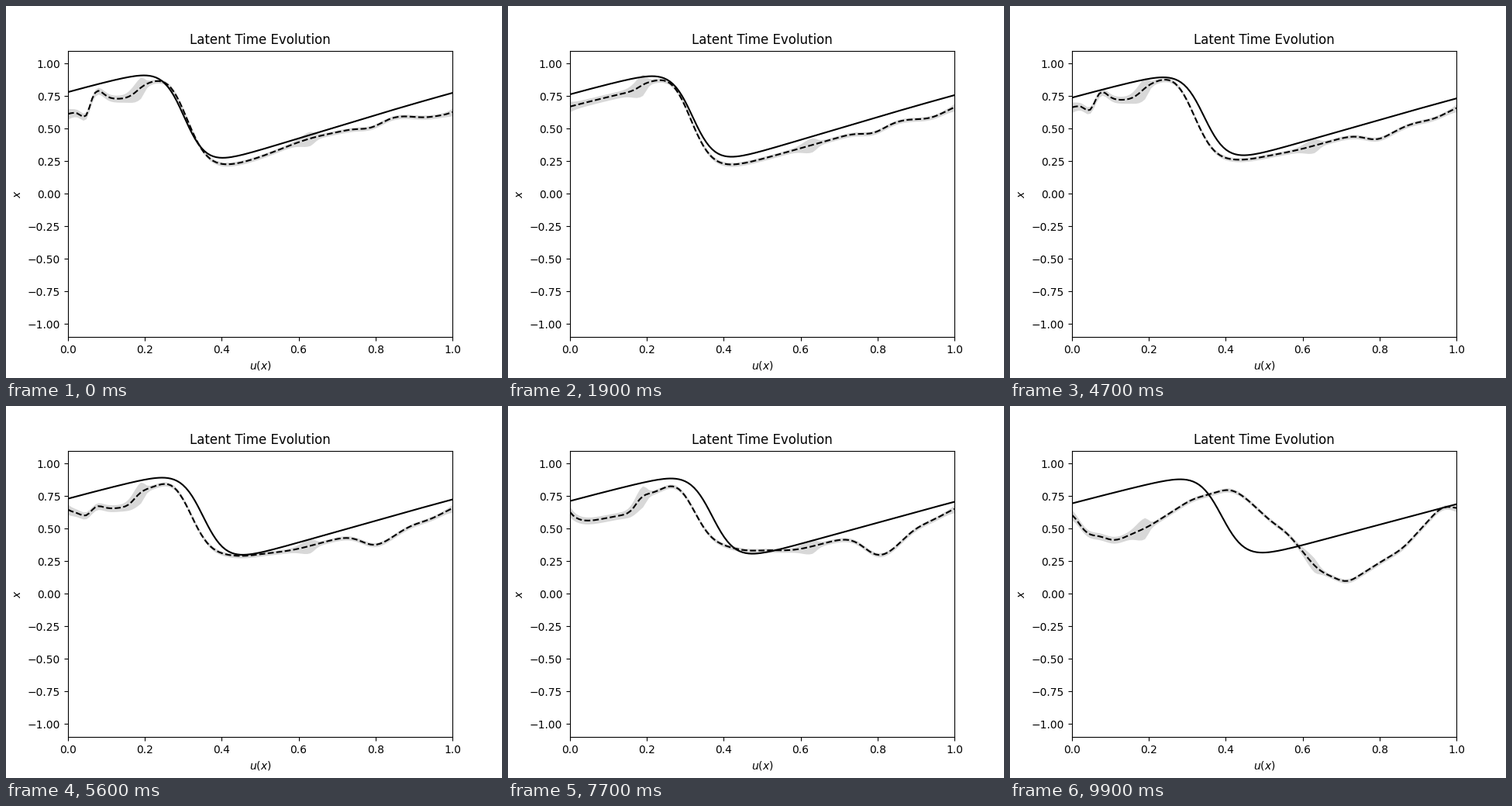
Write a matplotlib script that moves like this. It is 640x480 px and loops after 10000 ms.

```python
import numpy as np
import matplotlib.pyplot as plt
from matplotlib.animation import FuncAnimation

FRAMES = 100
INTERVAL = 100
N = 128
x = np.linspace(0, 1, N)


def lobe(centre, left, right=None):
    """Bell of height 1, optionally with a different width on each side."""
    s = np.where(x < centre, left, right or left)
    return np.exp(-0.5 * ((x - centre) / s) ** 2)


def below(edge, width):
    """Soft step: 1 left of the edge, 0 right of it."""
    return 0.5 * (1 - np.tanh((x - edge) / width))


def burgers(t, centre):
    """Viscous sawtooth on a periodic unit domain, t from 0 to 1."""
    slope = 1 / (1.205 + 0.102 * t)
    bow = 0.034 - 0.019 * t
    width = 2 * 0.0118 / slope
    d = x * (N - 1) / N - centre
    xi = d % 1
    step = 0.5 * (1 + np.tanh(d / (2 * width)))
    return (0.602 - 0.5625 * bow + slope * (d + 0.5 - step)
            + 6.75 * bow * xi ** 2 * (1 - xi))


def smooth_path(points, size=9):
    px, py = zip(*points)
    kernel = np.hanning(size + 2)[1:-1]
    y = np.pad(np.interp(x, px, py), size // 2, mode="edge")
    return np.convolve(y, kernel / kernel.sum(), mode="valid")


# Shapes the prediction error is built from
bias = (-0.045 - 0.035 * x - 0.05 * below(0.18, 0.02) + 0.045 * lobe(0.265, 0.035)
        - 0.04 * lobe(0.79, 0.03) - 0.045 * lobe(0.94, 0.04))
start = (-0.06 * below(0.055, 0.008) + 0.045 * lobe(0.63, 0.08)
         + 0.035 * lobe(0.82, 0.06) - 0.04 * lobe(1, 0.03))
ripple = (-0.07 * lobe(0.047, 0.013) + 0.07 * lobe(0.075, 0.016)
          - 0.045 * lobe(0.15, 0.035))
sink = (-0.15 * below(0.17, 0.02) - 0.085 * lobe(0.22, 0.04)
        + 0.12 * np.exp(-x / 0.025))
sag = (0.12 * lobe(0.40, 0.05) + 0.06 * lobe(0.50, 0.05)
       - 0.19 * lobe(0.825, 0.05))
drifted = smooth_path([(0, .635), (.038, .44), (.065, .455), (.11, .40), (.2, .517),
                       (.31, .725), (.41, .81), (.445, .755), (.52, .55),
                       (.56, .47), (.64, .18), (.715, .08), (.8, .24),
                       (.86, .345), (.965, .685), (1, .655)])


def predicted(frame):
    def level(times, values):
        return np.interp(frame, times, values)

    y = (burgers(0.2, 0.311 + 0.00025 * frame) + bias
         + start * level([0, 19], [1, 0])
         + ripple * level([0, 19, 30, 47, 64], [1, 0, 0, 1, 0])
         + sink * level([47, 64], [0, 1])
         + sag * level([30, 47, 64, 77], [0, 0.3, 0.8, 1]))
    drift = level([64, 71, 77, 88], [0, 0.8, 0, 1])
    return y + drift * (drifted - y)


def exact(frame):
    t = frame / (FRAMES - 1)
    return burgers(t, 0.301 + 0.086 * t)


spread = (0.016 + 0.010 * below(0.2, 0.02)
          + 0.014 * np.exp(-x / 0.015) + 0.015 * np.exp((x - 1) / 0.012)
          + 0.058 * lobe(0.188, 0.02, 0.009) + 0.039 * lobe(0.628, 0.022, 0.012))

fig, ax = plt.subplots(figsize=(6.4, 4.8), dpi=100)
ax.set(xlim=(0, 1), ylim=(-1.1, 1.1), title="Latent Time Evolution",
       xlabel="$u(x)$", ylabel="$x$")
band = ax.fill_between(x, x, x, color="gray", alpha=0.3, linewidth=0)
truth, = ax.plot([], [], "k-", lw=1.5)
guess, = ax.plot([], [], "k--", lw=1.5)


def update(frame):
    y = predicted(frame)
    truth.set_data(x, exact(frame))
    guess.set_data(x, y)
    upper = np.column_stack([x, y + spread])
    lower = np.column_stack([x, y - spread])
    band.set_verts([np.concatenate([upper, lower[::-1]])])
    return band, truth, guess


anim = FuncAnimation(fig, update, frames=FRAMES, interval=INTERVAL,
                     repeat=True, repeat_delay=0)
plt.show()
```
